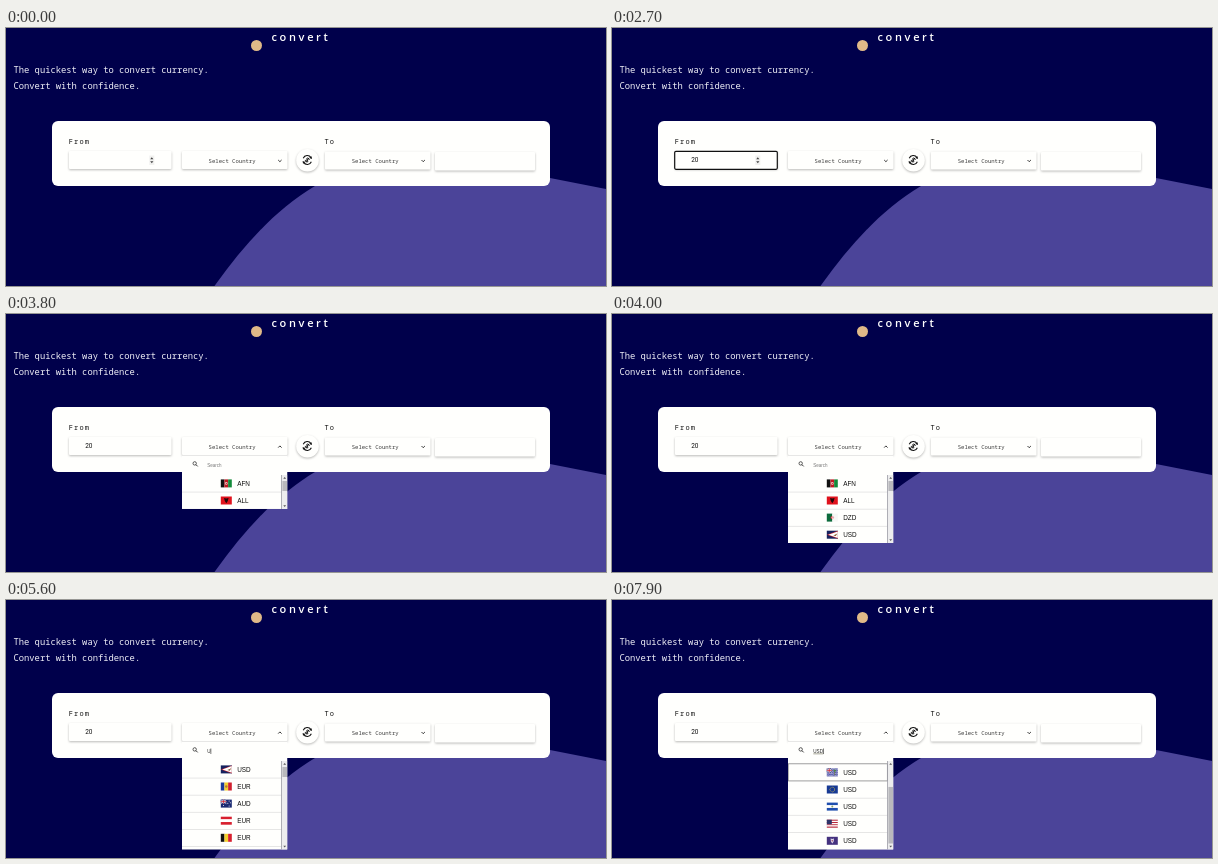
These frames come from a looping animation (600 by 258 pixels, 8 s). An HTML page:

```html
<!DOCTYPE html>
<html lang="en">
<head>
<meta charset="utf-8">
<title>Currency converter</title>
<style>
  html, body { margin: 0; width: 100%; height: 100%; overflow: hidden; background: #00004b; }
  svg { display: block; }
  #stage { width: 100vw; height: 100vh; }
  .mono { font-family: "Noto Sans Mono", monospace; }
  .sans { font-family: "Liberation Sans", Arial, sans-serif; }
  .lead { font-size: 8.8px; font-weight: 300; fill: #f0f0f8; }
  .label { font-size: 7px; font-weight: 500; letter-spacing: 1.1px; fill: #111; }
  .pick { font-size: 5.6px; fill: #3a3a3a; }
  .code { font-size: 6.4px; fill: #111; }
  .box { fill: #fffffd; filter: drop-shadow(0 1px 1px rgba(0, 0, 0, .27)); }
  .line { fill: none; stroke: #222; stroke-width: .9; }
</style>
</head>
<body>
<svg id="stage" viewBox="0 0 600 258" preserveAspectRatio="none">
  <rect width="600" height="258" fill="#00004b"/>
  <path d="M208.500 258C235 221 267 183 309 158C390 110 500 141 544 150L600 161V258Z" fill="#4b4499"/>

  <circle cx="250.500" cy="17.500" r="5.500" fill="#e0b988"/>
  <text x="265.500" y="13" font-family="Open Sans, sans-serif" font-size="11" font-weight="600" letter-spacing="2.650" fill="#fff">convert</text>
  <text class="mono lead" x="7.500" y="44.700">The quickest way to convert currency.</text>
  <text class="mono lead" x="7.500" y="61">Convert with confidence.</text>

  <rect x="46" y="93" width="498" height="65" rx="6" fill="#fffffd"/>
  <text class="mono label" x="62.800" y="116.300">From</text>
  <text class="mono label" x="318.500" y="116">To</text>

  <rect class="box" x="63" y="123" width="102.500" height="18" rx="1"/>
  <rect class="box" x="176" y="123" width="105.500" height="18" rx="1"/>
  <rect class="box" x="319" y="123.500" width="105.500" height="18" rx="1"/>
  <rect class="box" x="429" y="124" width="100" height="18.500" rx="1"/>

  <rect id="focus" x="62.700" y="123.300" width="102.600" height="18" rx="1.200" fill="none" stroke="#111" stroke-width="1.200"/>
  <g id="spin">
    <rect x="143.300" y="127.500" width="5" height="9.500" fill="#f1f1ef"/>
    <path d="M144.200 131.200L145.800 129.200L147.400 131.200ZM144.200 133.300L145.800 135.300L147.400 133.300Z" fill="#444"/>
  </g>
  <text id="amount" x="79.200" y="134.300" font-family="Roboto, sans-serif" font-size="6.500" fill="#111"></text>
  <rect id="caret" y="128.500" width=".6" height="7" fill="#111"/>

  <text class="mono pick" x="202.600" y="134.500">Select Country</text>
  <text class="mono pick" x="345.700" y="134.700">Select Country</text>
  <path id="arrow" class="line" d="M-1.700 -.8L0 .9L1.700 -.8"/>
  <path class="line" d="M415.500 132L417.200 133.700L418.900 132"/>

  <circle class="box" cx="301.500" cy="132.300" r="11.300"/>
  <g transform="translate(301.300 132) rotate(40)" fill="none" stroke="#111">
    <path d="M-4.300 1.200A4.400 4.400 0 0 1 1.300 -4.200M4.300 -1.200A4.400 4.400 0 0 1 -1.300 4.200" stroke-width="1.100"/>
    <path d="M.8 -5.700L3 -3.700L.2 -2.700ZM-.8 5.700L-3 3.700L-.2 2.700Z" fill="#111" stroke="none"/>
    <path d="M1.500 -1.300C.8 -2.300 -1.500 -2.100 -1.400 -.9C-1.300 .3 1.500 -.2 1.500 1.100C1.400 2.300 -.9 2.300 -1.600 1.200M0 -2.700V2.700" stroke-width=".9"/>
  </g>

  <svg id="panel" x="176" y="141" width="105.500" height="0" viewBox="0 0 105.500 0">
    <rect width="105.500" height="120" fill="#fffffd"/>
    <rect width="105.500" height=".6" fill="#d8d8d8"/>
    <circle cx="12.700" cy="8.400" r="1.700" fill="none" stroke="#333" stroke-width=".8"/>
    <path class="line" d="M14 9.700L15.700 11.400"/>
    <text id="query" class="sans" x="25.300" y="11.800"></text>
    <rect id="mark" x="25.300" y="12.600" width="10" height=".6" fill="#6b6b50"/>
    <rect id="bar" y="7.500" width=".6" height="5.500" fill="#222"/>
    <svg id="list" y="20" width="105.500" height="0">
      <g id="rows"></g>
      <rect x="99.700" width="5.800" height="110" fill="#ededee"/>
      <rect x="99.300" width=".7" height="110" fill="#8d8d98"/>
      <path d="M101.300 3.800L102.700 2L104.100 3.800Z" fill="#555"/>
      <rect id="thumb" x="100.400" width="4.600" fill="#b9b9bd"/>
      <path id="down" d="M101.300 -3.800L102.700 -2L104.100 -3.800Z" fill="#555"/>
    </svg>
  </svg>
</svg>
<script>
const LOOP = 8000, STEP = 100, ROW = 17.1, VIEW = 88.5;
const el = id => document.getElementById(id);
const set = (id, attrs) => { for (const k in attrs) el(id).setAttribute(k, attrs[k]); };
const show = (id, on) => set(id, { visibility: on ? 'visible' : 'hidden' });
const clamp = x => Math.max(0, Math.min(1, x));
const smooth = x => { x = clamp(x); return x * x * (3 - 2 * x); };
const within = (t, a, b) => t >= a && t < b;

// Flags are drawn on an 11 x 8 field.
const rect = (x, y, w, h, c) => `<rect x="${x}" y="${y}" width="${w}" height="${h}" fill="${c}"/>`;
const path = (d, c) => `<path d="${d}" fill="${c}"/>`;
const dot = (x, y, r, c) => `<circle cx="${x}" cy="${y}" r="${r}" fill="${c}"/>`;
const stroke = (d, c, w) => `<path d="${d}" fill="none" stroke="${c}" stroke-width="${w}"/>`;
const bands = (...cs) => cs.map((c, i) => rect(0, i * 8 / cs.length, 11, 8 / cs.length, c)).join('');
const pales = (...cs) => cs.map((c, i) => rect(i * 11 / cs.length, 0, 11 / cs.length, 8, c)).join('');
const jack = (w, h) => rect(0, 0, w, h, '#223078') +
  stroke(`M0 0L${w} ${h}M${w} 0L0 ${h}`, '#fff', .8) +
  stroke(`M${w / 2} 0V${h}M0 ${h / 2}H${w}`, '#fff', 1.4) +
  stroke(`M${w / 2} 0V${h}M0 ${h / 2}H${w}`, '#c8202f', .8);
const ring = () => Array.from({ length: 12 }, (_, i) => {
  const a = i * Math.PI / 6;
  return dot(5.5 + 2.4 * Math.cos(a), 4 + 2.4 * Math.sin(a), .42, '#f5d33b');
}).join('');
const waves = () => [1, 3, 5, 7].map(y =>
  stroke(`M0 ${y}q1.400 -1 2.750 0t2.750 0t2.750 0t2.750 0`, '#c9cdea', .7)).join('');

const flags = {
  af: pales('#111', '#c01822', '#138a3a') + dot(5.5, 4, 1.3, '#f0d6d2') + dot(5.5, 4, .6, '#c01822'),
  al: rect(0, 0, 11, 8, '#e0121c') + path('M5.500 2L7.800 1.600L7 4.500L5.500 6.800L4 4.500L3.200 1.600Z', '#21070a'),
  dz: pales('#0c6b3c', '#f7f7f5') + dot(5.5, 4, 1.7, '#d0202f') + dot(6.1, 4, 1.3, '#f7f7f5') + dot(6.2, 4, .5, '#d0202f'),
  as: rect(0, 0, 11, 8, '#16235f') + path('M11 0V8L0 4Z', '#bb2030') + path('M11 .7V7.300L1.500 4Z', '#fff') +
    path('M10.500 2.700L9 5.300L6.500 4.700L8.500 3.900Z', '#8a5a2c'),
  ad: pales('#1c3a9c', '#f4d02c', '#d0202f') + dot(5.5, 4, 1.2, '#b8763a'),
  au: rect(0, 0, 11, 8, '#1a2a72') + jack(5.5, 4) + [[2.7, 6], [8.3, 1.5], [7, 3.6], [9.6, 3.2], [8.3, 6.4]]
    .map(([x, y]) => dot(x, y, .5, '#fff')).join(''),
  at: bands('#d8202f', '#fff', '#d8202f'),
  be: pales('#111', '#f4d02c', '#d8202f'),
  nl: bands('#b31d2c', '#fff', '#21468b'),
  io: rect(0, 0, 11, 8, '#5557a8') + waves() + jack(5, 4) + rect(7.6, 2, .7, 5, '#6a7a3a') + dot(8, 2.2, 1.2, '#4d8248'),
  eu: rect(0, 0, 11, 8, '#173a94') + ring(),
  sv: bands('#1f4fae', '#fff', '#1f4fae') + dot(5.5, 4, 1, '#8aa46a'),
  us: bands('#b8263a', '#fff', '#b8263a', '#fff', '#b8263a', '#fff', '#b8263a') + rect(0, 0, 5, 4.57, '#2e3468'),
  vi: rect(0, 0, 11, 8, '#45327f') + path('M3.800 1.600L5.500 2.300L7.200 1.600L6.900 4.700L5.500 6.700L4.100 4.700Z', '#d9d3e8') + dot(5.5, 4, .8, '#a04f6a')
};

const lists = {
  all: 'af AFN,al ALL,dz DZD,as USD,ad EUR,',
  u: 'as USD,ad EUR,au AUD,at EUR,be EUR,',
  usd: 'as USD,nl USD,io USD,eu USD,sv USD,us USD,vi USD'
};
const drawRow = (item, i) => {
  const [flag, code] = item.split(' ');
  const y = i * ROW;
  return rect(0, y + ROW - .4, 99.5, .7, '#dcdcdc') + (code ?
    `<g transform="translate(38.800 ${y + 4.4})">${flags[flag]}</g>` +
    `<text class="sans code" x="55.200" y="${y + 10.9}">${code}</text>` : '');
};
el('rows').innerHTML = Object.keys(lists).map(k =>
  `<g id="list-${k}">${lists[k].split(',').map(drawRow).join('')}</g>`).join('') +
  `<rect id="hover" x=".3" y="${2 * ROW - .2}" width="99" height="${ROW}" fill="none" stroke="#8a8a8a" stroke-width=".7"/>`;

function drawAmount(t) {
  const text = t < 2000 ? '' : t < 2200 ? '2' : '20';
  const focused = within(t, 500, 3500);
  el('amount').textContent = text;
  show('focus', focused);
  show('spin', t < 3500);
  set('caret', { x: 79.2 + text.length * 3.65 });
  show('caret', within(t, 600, 1100) || within(t, 2000, 2700) || within(t, 3300, 3500));
}

function drawSearch(t) {
  const text = t < 5600 ? '' : t < 6100 ? 'U' : t < 6600 ? 'US' : 'USD';
  const query = el('query');
  query.textContent = text || 'Search';
  query.setAttribute('fill', text ? '#222' : '#777');
  query.setAttribute('font-size', text ? 4.6 : 4.5);
  set('bar', { x: 25.2 + [0, 3.4, 6.5, 9.9][text.length] });
  show('bar', within(t, 4500, 5100) || within(t, 5600, 7100) || t >= 7600);
  show('mark', t >= 7600);
}

function drawPanel(t) {
  const height = t < 3500 ? 0 : Math.min(20 + VIEW, 20 + (t - 3600) * .17);
  const listHeight = Math.max(0, height - 20);
  set('panel', { height, viewBox: `0 0 105.5 ${height}` });
  set('list', { height: listHeight });
  set('arrow', { transform: `translate(273.900 132.800) rotate(${-180 * smooth((t - 3500) / 300)})` });

  const current = t < 5600 ? 'all' : t < 6100 ? 'u' : 'usd';
  for (const k in lists) el('list-' + k).style.display = k === current ? '' : 'none';

  const max = 7 * ROW - VIEW;
  const p = smooth((t - 7200) / 700);
  set('rows', { transform: `translate(0 ${-max * p})` });
  show('hover', t >= 7800);

  const track = Math.max(0, listHeight - 12);
  const size = Math.min(track, current === 'usd' ? track * VIEW / (7 * ROW) : 10);
  set('thumb', { y: 6 + (track - size) * p, height: size });
  set('down', { transform: `translate(0 ${listHeight})` });
}

function render(now) {
  const t = Math.floor(now % LOOP / STEP) * STEP;
  drawAmount(t);
  drawSearch(t);
  drawPanel(t);
}

const start = performance.now();
function tick() {
  render(performance.now() - start);
  requestAnimationFrame(tick);
}
tick();
</script>
</body>
</html>
```
